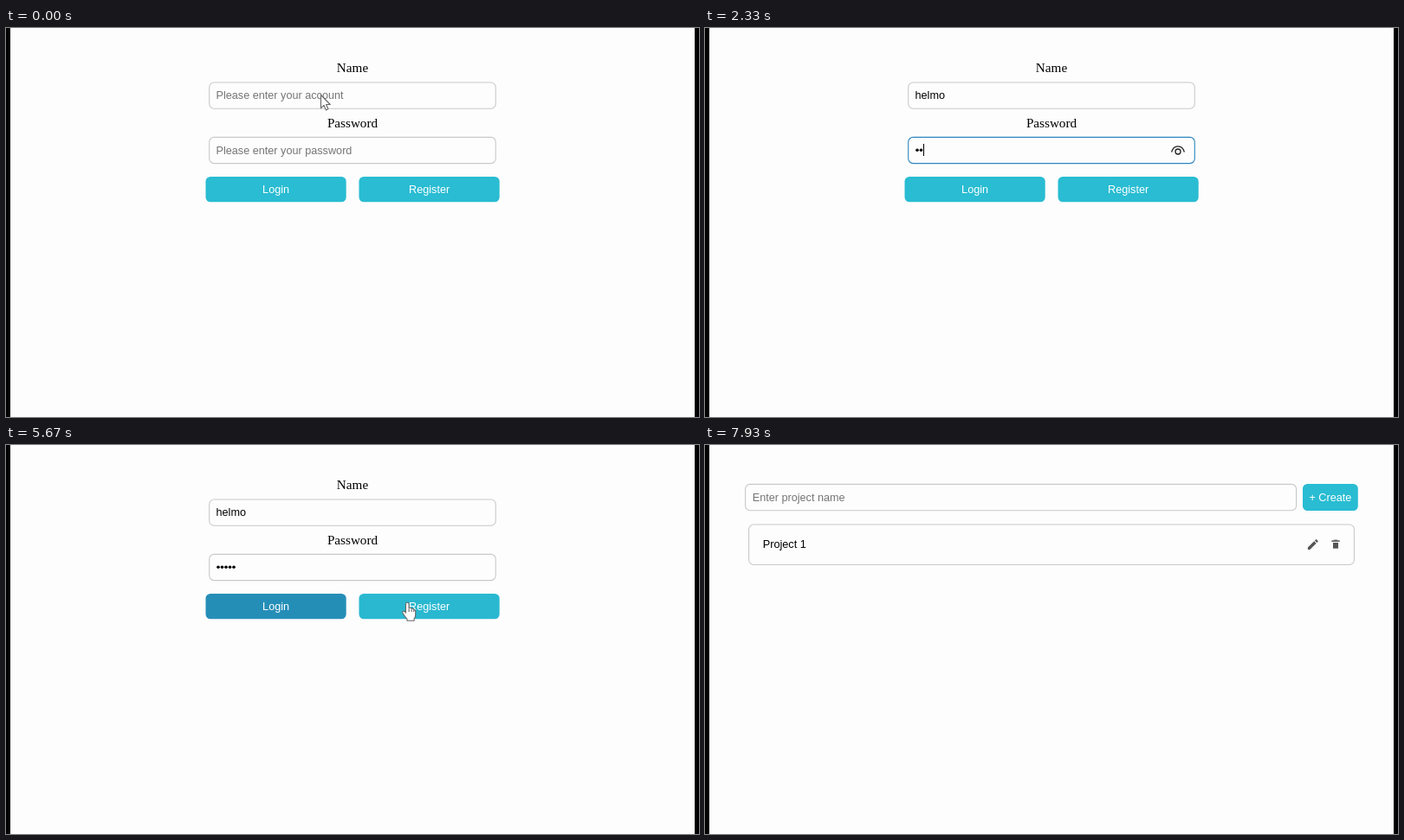
Write an HTML page with a canvas that moves like this. It is 800 px wide and 450 px high and loops after 8 s.

```html
<!DOCTYPE html>
<html lang="en">
<head>
<meta charset="utf-8">
<title>Login and project list</title>
<style>
  html, body { margin: 0; width: 100%; height: 100%; overflow: hidden; background: #000; }
  canvas { display: block; width: 100vw; height: 100vh; }
</style>
</head>
<body>
<canvas id="stage" width="800" height="450"></canvas>
<script>
const ctx = document.getElementById('stage').getContext('2d');
const LOOP = 8000;
const SANS = '12.67px "Liberation Sans", Arial, sans-serif';
const SERIF = '15.2px "Liberation Serif", "Times New Roman", serif';
const GREY = '#c9c9c9', FOCUS = '#2b86bd', HINT = '#757575';
const CYAN = [41, 188, 210], BLUE = [36, 134, 178];

const USER = 'helmo';
const userKeys = [1030, 1170, 1300, 1440, 1600];
const passKeys = [2140, 2300, 2480, 2730, 2900];
const FOCUS_USER = 500, FOCUS_PASS = 1930, SUBMIT = 5350, PAGE_TWO = 6130;

// Pointer stops: time, x, y
const paths = [
  [[0, 363, 77], [250, 361, 77], [600, 358, 76]],
  [[3660, 300, 97], [4130, 547, 138], [4480, 547, 138], [5080, 330, 182],
   [5480, 330, 182], [5860, 594, 182], [6730, 594, 182], [7200, 484, 84], [7560, 503, 70], [7720, 506, 66]]
];

const arrow = new Path2D('M0 0V15.2L3.6 11.9L5.9 17.4L8.4 16.3L6.1 11H10.8Z');
const hand = new Path2D('M-2 10V1.3Q-2 -.3 -.2 -.3Q1.6 -.3 1.6 1.3V6.2' +
  'Q3.8 5 4.7 7Q7 6.2 7.4 8.2Q9.2 7.6 9.2 10V14Q9.2 16.5 7.6 18.3V20.8H-.5V18.8' +
  'Q-3 16.4 -5.6 11.8Q-6.2 10.2 -4.7 9.7Q-3.3 9.4 -2 11.6Z');
const pencil = new Path2D('M3 17.25V21h3.75L17.81 9.94l-3.75-3.75L3 17.25z' +
  'M20.71 7.04a1 1 0 0 0 0-1.41l-2.34-2.34a1 1 0 0 0-1.41 0l-1.83 1.83 3.75 3.75z');

const clamp = v => Math.max(0, Math.min(1, v));
const ease = v => { v = clamp(v); return v * v * (3 - 2 * v); };
const typed = (keys, t) => keys.filter(k => k <= t).length;
const hover = (t, enter, leave) => ease((t - enter) / 300) * (1 - ease((t - leave) / 300));

function text(str, x, y, color, font = SANS, align = 'left') {
  ctx.font = font;
  ctx.fillStyle = color;
  ctx.textAlign = align;
  ctx.fillText(str, x, y);
}

function box(x, y, w, h, color, filled) {
  ctx.beginPath();
  ctx.roundRect(x, y, w, h, 5.5);
  ctx.lineWidth = 1.1;
  if (filled) { ctx.fillStyle = color; ctx.fill(); }
  else { ctx.strokeStyle = color; ctx.stroke(); }
}

function button(label, x, y, w, h, baseline, dark = 0) {
  const rgb = CYAN.map((c, i) => Math.round(c + (BLUE[i] - c) * dark));
  box(x, y, w, h, `rgb(${rgb})`, true);
  text(label, x + w / 2, baseline, '#fff', SANS, 'center');
}

function caret(t, since, x, y) {
  if ((t - since) % 1000 >= 500) return;
  ctx.fillStyle = '#000';
  ctx.fillRect(Math.round(x), y, 1, 14);
}

function eye() {
  ctx.strokeStyle = '#222';
  ctx.lineWidth = 1.3;
  ctx.beginPath();
  ctx.moveTo(538.6, 143.5);
  ctx.bezierCurveTo(541, 134.6, 551, 134.6, 553.4, 143.5);
  ctx.stroke();
  ctx.beginPath();
  ctx.arc(546, 143, 3, 0, 7);
  ctx.stroke();
}

function loginPage(t) {
  const onUser = t >= FOCUS_USER && t < FOCUS_PASS;
  const onPass = t >= FOCUS_PASS && t < SUBMIT;
  const name = USER.slice(0, typed(userKeys, t));
  const dots = typed(passKeys, t);

  text('Name', 400, 51.3, '#000', SERIF, 'center');
  box(234.7, 63, 330.6, 30.2, onUser ? FOCUS : GREY);
  text(name || 'Please enter your account', 242.5, 82.2, name ? '#000' : HINT);
  if (onUser) {
    const last = userKeys[name.length - 1] || FOCUS_USER;
    caret(t, last, 242.5 + ctx.measureText(name).width, 71);
  }

  text('Password', 400, 114.6, '#000', SERIF, 'center');
  box(234.7, 126.4, 330.6, 30.2, onPass ? FOCUS : GREY);
  if (!dots) text('Please enter your password', 242.5, 145.6, HINT);
  ctx.fillStyle = '#000';
  for (let i = 0; i < dots; i++) {
    ctx.beginPath();
    ctx.arc(245 + i * 4.5, 141.2, 1.8, 0, 7);
    ctx.fill();
  }
  if (onPass) {
    if (dots) eye();
    caret(t, passKeys[dots - 1] || FOCUS_PASS, 242.5 + dots * 4.5, 134);
  }

  button('Login', 230.5, 172, 162.2, 29.3, 190.6, hover(t, 4900, 5600));
  button('Register', 407.5, 172, 162.2, 29.3, 190.6, hover(t, 5620, 5745));
}

function projectPage() {
  box(46.6, 45.4, 636, 30.4, GREY);
  text('Enter project name', 54.7, 65.2, HINT);
  button('+ Create', 690, 45, 63.8, 31, 65.2);
  box(50.6, 92, 698.8, 46.5, GREY);
  text('Project 1', 66.8, 119.3, '#000');

  ctx.fillStyle = '#555';
  ctx.save();
  ctx.translate(693.9, 107.2);
  ctx.scale(0.66, 0.66);
  ctx.fill(pencil);
  ctx.restore();
  ctx.fillRect(723.3, 110.4, 9.4, 1.5);
  ctx.fillRect(725.8, 109.6, 4.4, 1);
  ctx.fillRect(725, 113, 6, 6.7);
}

function pointerAt(t) {
  const path = paths.find(p => t >= p[0][0] && t < p[p.length - 1][0]);
  if (!path) return null;
  const i = path.findIndex(p => p[0] > t);
  const [t0, x0, y0] = path[i - 1], [t1, x1, y1] = path[i];
  const k = ease((t - t0) / (t1 - t0));
  return [x0 + (x1 - x0) * k, y0 + (y1 - y0) * k];
}

function pointer(t) {
  const pos = pointerAt(t);
  if (!pos) return;
  const [x, y] = pos;
  const onEye = x > 537 && x < 555 && y > 130 && y < 152;
  const onButton = y >= 172 && y <= 201 && ((x > 230 && x < 393) || (x > 407 && x < 570));
  const shape = t < PAGE_TWO && (onEye || onButton) ? hand : arrow;
  ctx.save();
  ctx.translate(x + 0.5, y + 0.5);
  ctx.fillStyle = '#fff';
  ctx.fill(shape);
  ctx.strokeStyle = '#666';
  ctx.lineWidth = 1.1;
  ctx.lineJoin = 'round';
  ctx.stroke(shape);
  // Finger creases
  if (shape === hand) {
    ctx.beginPath();
    for (const fx of [1.6, 4.6, 7.2]) { ctx.moveTo(fx, 6.5 + fx / 4); ctx.lineTo(fx, 10.5); }
    ctx.stroke();
  }
  ctx.restore();
}

function draw(now) {
  const t = now % LOOP;
  ctx.fillStyle = '#000';
  ctx.fillRect(0, 0, 800, 450);
  ctx.fillStyle = '#fdfdfd';
  ctx.fillRect(5, 0, 790, 450);
  if (t < PAGE_TWO) loginPage(t);
  else projectPage();
  pointer(t);
}

const start = performance.now();
function frame() {
  draw(performance.now() - start);
  requestAnimationFrame(frame);
}
frame();
</script>
</body>
</html>
```
